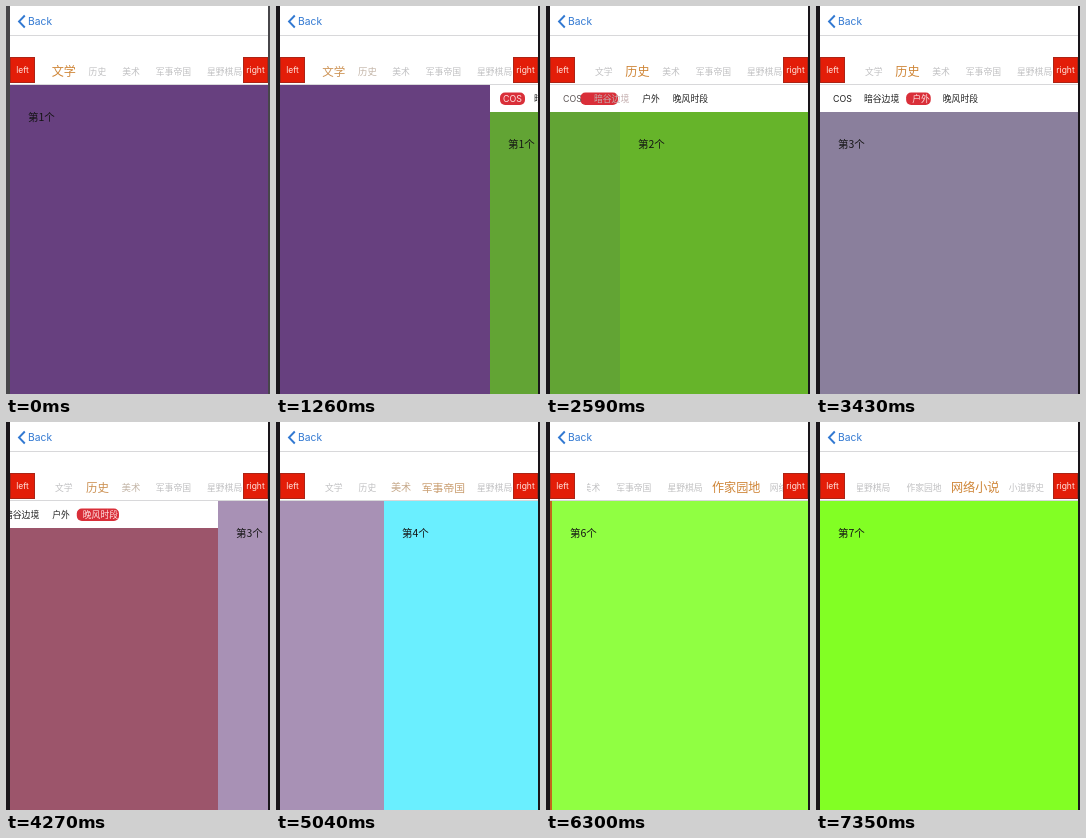
These frames come from a looping animation (264x388 px, 7.49 s). An HTML page with a canvas:

```html
<!DOCTYPE html>
<html lang="zh-CN">
<head>
<meta charset="utf-8">
<title>Tab pager</title>
<style>
html, body { margin: 0; width: 100%; height: 100%; overflow: hidden; background: #fff; }
canvas { display: block; width: 264px; height: 388px; }
</style>
</head>
<body>
<canvas id="stage"></canvas>
<script>
const W = 264, H = 388, LOOP = 7490, STEP = 70;
const LEFT = 4, RIGHT = 262, PAGE_W = RIGHT - LEFT;
const TOP = 79, SUB_H = 27;
const TAB_LEFT = 41, TAB_RIGHT = 237, TAB_SIZE = 8.8;
const CJK = '"Noto Sans CJK SC", "Noto Sans CJK", sans-serif';
const LATIN = 'Inter, Roboto, sans-serif';

const canvas = document.getElementById('stage');
const ctx = canvas.getContext('2d');
const dpr = window.devicePixelRatio || 1;
canvas.width = W * dpr;
canvas.height = H * dpr;

const pageColors = ['#67407f', '#62a430', '#a891b5', '#6aefff', '#c2661e', '#90ff42', '#82ff24'];
const innerColors = ['#62a434', '#66b42a', '#8a7f9c', '#9c556b'];

const GREY = [192, 192, 194], ORANGE = [207, 134, 56];
const INK = [34, 34, 34], PALE = [255, 225, 225];

// Tabs are laid out left to right with a fixed gap.
function layout(names, x, gap) {
  return names.map(name => {
    const w = name === 'COS' ? 17 : name.length * TAB_SIZE;
    const tab = { name, x, w, c: x + w / 2 };
    x += w + gap;
    return tab;
  });
}
const tabs = layout(['文学', '历史', '美术', '军事帝国', '星野棋局', '作家园地', '网络小说', '小道野史'], 49, 16);
const subTabs = layout(['COS', '暗谷边境', '户外', '晚风时段'], 14, 13);
const lastTab = tabs[tabs.length - 1];
const maxScroll = lastTab.x + lastTab.w + 9 - TAB_RIGHT;

// Each swipe: finger down, finger up, share dragged, settled.
const swipe = (pager, down, up, share, end) => ({ pager, down, up, share, end });
const swipes = [
  swipe('outer', 800, 1260, 0.186, 1850),
  swipe('inner', 2180, 2440, 0.23, 2950),
  swipe('inner', 2940, 3080, 0.2, 3480),
  swipe('inner', 3470, 3590, 0.2, 4020),
  swipe('outer', 4070, 4270, 0.193, 4720),
  swipe('outer', 4790, 4942, 0.2, 5420),
  swipe('outer', 5390, 5480, 0.2, 5870),
  swipe('outer', 5850, 5940, 0.2, 6400),
  swipe('outer', 6420, 6540, 0.2, 6910)
];

const clamp = (v, lo = 0, hi = 1) => Math.min(hi, Math.max(lo, v));
const mix = (a, b, k) => a + (b - a) * k;
const smooth = k => k * k * (3 - 2 * k);
const mixColor = (a, b, k) => `rgb(${a.map((v, i) => Math.round(mix(v, b[i], k)))})`;
const near = (index, pos) => clamp(1 - Math.abs(index - pos));

function progress(s, t) {
  if (t < s.up) return s.share * clamp((t - s.down) / (s.up - s.down)) ** 2;
  const k = clamp((t - s.up) / (s.end - s.up));
  return mix(s.share, 1, 1 - (1 - k) ** 3);
}

// The tab strip centres the chosen tab once its page has settled.
function poseAt(t) {
  const pose = { outer: 0, inner: 0, scroll: 0 };
  const middle = (TAB_LEFT + TAB_RIGHT) / 2;
  let chosen = 0;
  for (const s of swipes) {
    pose[s.pager] += progress(s, t);
    if (s.pager === 'outer') {
      const goal = clamp(tabs[++chosen].c - middle, 0, maxScroll);
      pose.scroll = mix(pose.scroll, goal, smooth(clamp((t - s.end) / 290)));
    }
  }
  return pose;
}

function rect(color, x, y, w, h) {
  ctx.fillStyle = color;
  ctx.fillRect(x, y, w, h);
}

function text(str, x, y, size, color, align = 'left', font = CJK) {
  ctx.font = `${size}px ${font}`;
  ctx.fillStyle = color;
  ctx.textAlign = align;
  ctx.textBaseline = 'alphabetic';
  ctx.fillText(str, x, y);
}

function clipped(x, y, w, h, draw) {
  ctx.save();
  ctx.beginPath();
  ctx.rect(x, y, w, h);
  ctx.clip();
  draw();
  ctx.restore();
}

function drawPages(pos, y, colors, originX, drawSpecial) {
  colors.forEach((color, i) => {
    const x = Math.round(originX + (i - pos) * PAGE_W);
    if (x >= RIGHT || x + PAGE_W <= LEFT) return;
    if (drawSpecial && drawSpecial(i, x)) return;
    rect(color, x, y, PAGE_W, H - y);
    text(`第${i + 1}个`, x + 18, y + 35.5, 10.5, '#141414');
  });
}

function pillSpan(i) {
  const tab = subTabs[i];
  return i ? [tab.x - 6, tab.x + tab.w + 1] : [10, 35];
}

function drawSubPager(x, pos) {
  clipped(x, TOP, PAGE_W, H - TOP, () => {
    drawPages(pos, TOP + SUB_H, innerColors, x);
    rect('#fff', x, TOP, PAGE_W, SUB_H);
    const i = Math.min(Math.floor(pos), subTabs.length - 2);
    const a = pillSpan(i), b = pillSpan(i + 1), k = pos - i;
    const l = mix(a[0], b[0], k), r = mix(a[1], b[1], k);
    ctx.fillStyle = '#d92f39';
    ctx.beginPath();
    ctx.roundRect(x + l, 86.5, r - l, 12.5, 5);
    ctx.fill();
    subTabs.forEach((tab, n) => {
      const color = mixColor(INK, PALE, near(n, pos));
      text(tab.name, x + tab.c, 96.2, TAB_SIZE, color, 'center', n ? CJK : LATIN);
    });
  });
}

function drawTabs(pos, scroll) {
  clipped(TAB_LEFT, 30, TAB_RIGHT - TAB_LEFT, 48, () => {
    tabs.forEach((tab, i) => {
      const k = near(i, pos);
      const size = TAB_SIZE * (1 + 0.38 * k);
      text(tab.name, tab.c - scroll, 65.2 + size * 0.4, size, mixColor(GREY, ORANGE, k), 'center');
    });
  });
}

function drawButton(label, x) {
  rect('#ab2416', x, 51, 25, 26);
  rect('#e31d08', x + 1, 52, 23, 24);
  text(label, x + 12.5, 67, 8.5, '#ffe4de', 'center', LATIN);
}

function drawNav() {
  rect('#fff', 0, 0, W, TOP);
  rect('#d8d8da', LEFT, 29, PAGE_W, 1);
  rect('#d8d8da', LEFT, 78, PAGE_W, 1);
  ctx.strokeStyle = '#3279d2';
  ctx.lineWidth = 1.9;
  ctx.beginPath();
  ctx.moveTo(18.8, 9.5);
  ctx.lineTo(13, 15.5);
  ctx.lineTo(18.8, 21.5);
  ctx.stroke();
  text('Back', 22, 19, 10.3, '#3279d2', 'left', LATIN);
}

function draw(t) {
  const { outer, inner, scroll } = poseAt(t);
  ctx.setTransform(dpr, 0, 0, dpr, 0, 0);
  rect('#fff', 0, 0, W, H);
  drawPages(outer, TOP, pageColors, LEFT, (i, x) => {
    if (i !== 1) return false;
    drawSubPager(x, inner);
    return true;
  });
  drawNav();
  drawTabs(outer, scroll);
  drawButton('left', LEFT);
  drawButton('right', TAB_RIGHT);
  const edge = t < 840 ? '#47464a' : '#19151a';
  rect(edge, 0, 0, LEFT, H);
  rect(edge, RIGHT, 0, W - RIGHT, H);
}

const began = performance.now();
function tick() {
  const t = (performance.now() - began) % LOOP;
  draw(Math.floor(t / STEP) * STEP);
  requestAnimationFrame(tick);
}
tick();
</script>
</body>
</html>
```
